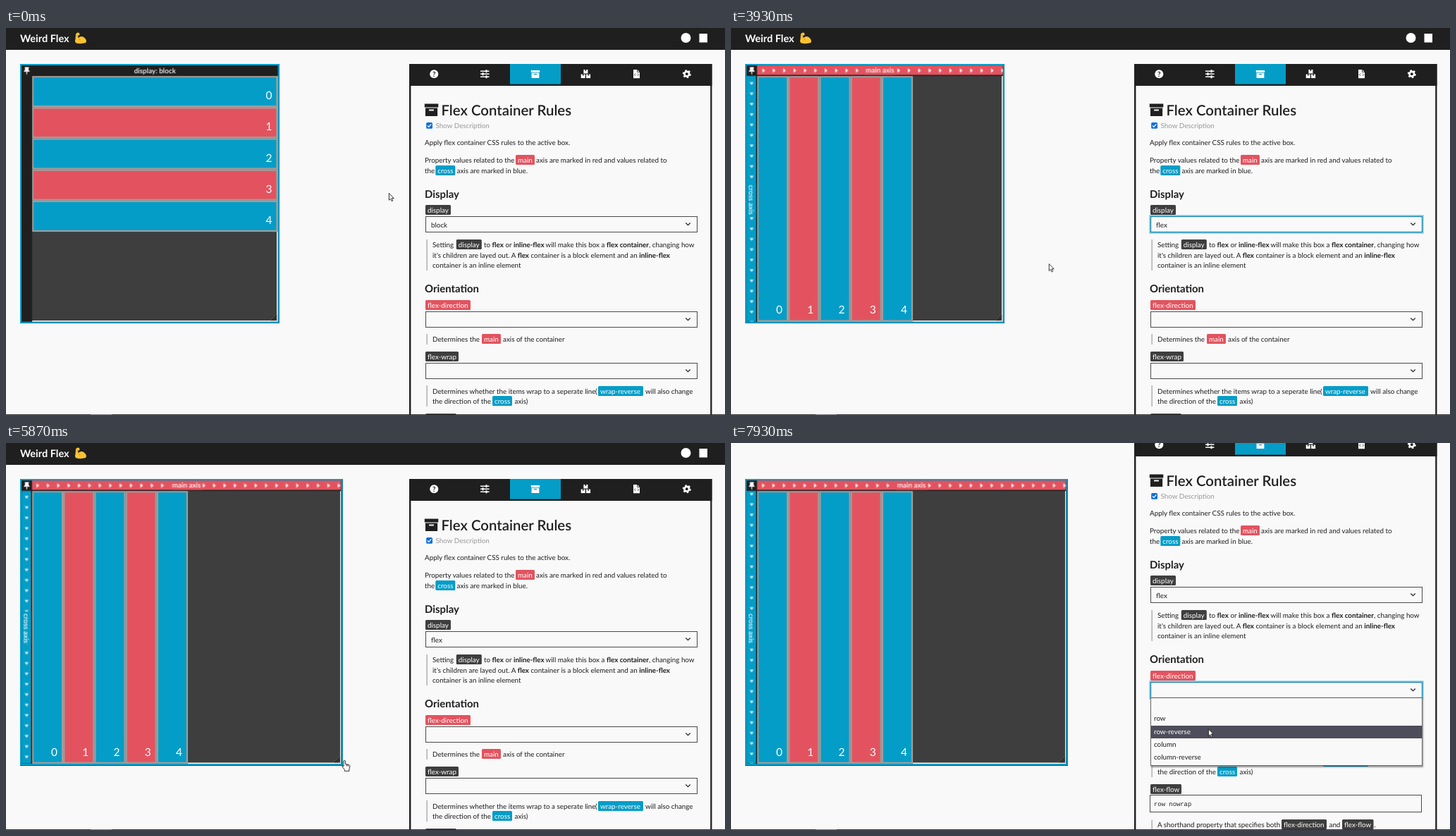
These frames come from a looping animation (1020 by 549 pixels, 8000 ms). An HTML page:

```html
<!DOCTYPE html>
<html lang="en">
<head>
<meta charset="utf-8">
<title>Weird Flex</title>
<style>
:root { --blue: #049dc7; --red: #e3535f; --dark: #3e3e3e; --ink: #1f1f1f; --paper: #f9f9f9; }
html, body { margin: 0; width: 100%; height: 100%; overflow: hidden; background: var(--paper); }
body { font-family: Lato, sans-serif; color: var(--ink); text-rendering: geometricPrecision; }
#stage { position: absolute; left: 0; top: 0; width: 1020px; height: 549px; overflow: hidden; }
#stage svg { display: block; }
.step { animation: 8s step-end infinite; }

/* Scrolling page: header and rules panel */
#page { position: absolute; left: 0; top: 0; width: 1020px; height: 700px; animation: scroll 8s ease-in-out infinite; }
#page text { font-size: 9.83px; fill: var(--ink); white-space: pre; }
#page .b { font-weight: 700; }
#page .logo { font-size: 14.5px; font-weight: 700; fill: #fff; }
#page .h1 { font-size: 20.4px; font-weight: 600; }
#page .h2 { font-size: 14.9px; font-weight: 700; }
#page .chip { fill: #fff; }
#page .muted { fill: #999; }
#page .mono { font: 8.9px "Liberation Mono", monospace; }
.ring { fill: none; }
.r1 { animation-name: ring1; }
.r2 { animation-name: open2; }
.vblock { animation-name: blockOnly; }
.vflex { animation-name: flexOn; }

.list { position: absolute; left: 595px; width: 384px; padding: 2px 0; background: var(--paper);
  border: 1px solid #666; box-shadow: 1px 2px 2px rgba(0,0,0,.4); font-size: 9.83px; }
.list div { height: 18.25px; line-height: 18.25px; padding-left: 4px; }
#list1 { top: 290px; animation-name: open1; }
#list2 { top: 424px; animation-name: open2; }

/* Demo box, laid out in CSS pixels and scaled to the screen */
#box { position: absolute; left: 19.6px; top: 51.2px; box-sizing: border-box; width: 499px; height: 499px;
  transform: scale(.737); transform-origin: 0 0; border: 3px solid var(--blue); background: var(--dark);
  animation: resize 8s ease-in-out infinite; }
#items { position: absolute; inset: 0; display: flex; flex-direction: column; animation-name: layout; }
#items div { flex: 0 0 60px; box-sizing: border-box; position: relative; border: 3px solid #a09d9b;
  background: var(--blue); color: #fff; font-size: 21px; line-height: 1.2; }
#items div:nth-child(even) { background: var(--red); }
#items span { position: absolute; right: 8px; bottom: 7px; }
#bars { position: absolute; inset: 0; color: #fff; font-size: 13.5px; font-weight: 600; animation-name: bars; }
.bar, .axis, .label { position: absolute; }
.bar { background: var(--ink); }
.top { left: 20px; right: 0; top: 0; height: 20px; }
.side { left: 0; top: 20px; bottom: 0; width: 20px; }
.label { inset: 0; display: flex; align-items: center; justify-content: center; }
.label span { line-height: 18px; }
.side .label { writing-mode: vertical-rl; }
.axis { inset: 0; overflow: hidden; animation-name: flexOn; }
.top .axis { bottom: 2px; background: var(--red); }
.side .axis { right: 2px; background: var(--blue); }
.top .axis span { background: var(--red); padding: 0 2px; }
.side .axis span { background: var(--blue); padding: 4px 0 1px; }
.axis svg { position: absolute; width: 100%; height: 100%; }
.runX { animation: runX 8s linear infinite; }
.runY { animation: runY 8s linear infinite; }
.pin { position: absolute; left: 0; top: 0; width: 20px; height: 20px; background: var(--ink); }
.grip { position: absolute; right: 2px; bottom: 2px; width: 12px; height: 12px;
  clip-path: polygon(100% 0, 100% 100%, 0 100%);
  background: repeating-linear-gradient(135deg, #111 0 1.6px, #777 1.6px 3px); }

#cursor { position: absolute; left: 0; top: 0; overflow: visible; animation: move 8s ease-in-out infinite; }
#cursor g { fill: #fff; stroke: #1c1c1c; stroke-width: .9; stroke-linejoin: round; }
#arrow { animation-name: arrow; }
#diag { animation-name: diag; }
#hand { animation-name: hand; }

@keyframes scroll { 0%, 83.87% { transform: none } 90%, 100% { transform: translateY(-63px) } }
@keyframes resize { 0%, 61.6% { width: 499px; height: 499px } 70.8%, 100% { width: 620.5px; height: 551px } }
@keyframes layout {
  0% { flex-direction: column; left: 20px; top: 20px; box-shadow: inset -2px -2px #fff }
  45.85% { flex-direction: row; left: 20px; top: 20px; box-shadow: inset -2px -2px #fff }
  59.1% { flex-direction: row; left: 0; top: 0; box-shadow: inset 0 0 transparent }
  71.45%, 100% { flex-direction: row; left: 20px; top: 20px; box-shadow: inset -2px -2px #fff }
}
@keyframes bars { 0% { opacity: 1 } 59.1% { opacity: 0 } 71.45%, 100% { opacity: 1 } }
@keyframes blockOnly { 0% { opacity: 1 } 45.85%, 100% { opacity: 0 } }
@keyframes flexOn { 0% { opacity: 0 } 45.85%, 100% { opacity: 1 } }
@keyframes ring1 { 0% { opacity: 0 } 34.1% { opacity: 1 } 59.1%, 100% { opacity: 0 } }
@keyframes open1 { 0% { opacity: 0 } 34.1% { opacity: 1 } 45.85%, 100% { opacity: 0 } }
@keyframes open2 { 0% { opacity: 0 } 94.1%, 100% { opacity: 1 } }
/* Arrows cross 5% of the axis length each second and restart with the bars */
@keyframes runX { 0%, 45.85% { transform: none } 59.1% { transform: translateX(25.1px) }
  71.5% { transform: none } 100% { transform: translateX(67.7px) } }
@keyframes runY { 0%, 45.85% { transform: none } 59.1% { transform: translateY(25.1px) }
  71.5% { transform: none } 100% { transform: translateY(59.9px) } }
@keyframes litBlock { 0% { background: #4e4d5b; color: #fff } 39.5%, 100% { background: none; color: #1f1f1f } }
@keyframes litFlex { 0% { background: none; color: #1f1f1f } 39.5%, 100% { background: #4e4d5b; color: #fff } }
@keyframes litBlank { 0% { background: #4e4d5b } 96.9%, 100% { background: none } }
@keyframes litRow { 0% { background: none; color: #1f1f1f } 96.9% { background: #4e4d5b; color: #fff }
  98%, 100% { background: none; color: #1f1f1f } }
@keyframes litReverse { 0% { background: none; color: #1f1f1f } 98%, 100% { background: #4e4d5b; color: #fff } }
@keyframes arrow { 0% { opacity: 1 } 56.6% { opacity: 0 } 74.6%, 100% { opacity: 1 } }
@keyframes diag { 0% { opacity: 0 } 56.6% { opacity: 1 } 72.45%, 100% { opacity: 0 } }
@keyframes hand { 0% { opacity: 0 } 72.45% { opacity: 1 } 74.6%, 100% { opacity: 0 } }
@keyframes move {
  0%, 2.5% { transform: translate(543px, 234px) }
  6.6%, 7.5% { transform: translate(530px, 233px) }
  9% { transform: translate(525px, 231px) }
  15%, 20.9% { transform: translate(595px, 209px) }
  22.5% { transform: translate(592.5px, 210px) }
  30%, 34.1% { transform: translate(714px, 284px) }
  42.5% { transform: translate(705px, 316px) }
  45.2% { transform: translate(705px, 316px); animation-timing-function: ease-in }
  49.125% { transform: translate(451px, 334px); animation-timing-function: ease-out }
  56.6%, 61.6% { transform: translate(376px, 409px) }
  70.8%, 71.8% { transform: translate(465px, 447px) }
  72.5%, 73.6% { transform: translate(480px, 451px) }
  82.5%, 88% { transform: translate(724px, 387px) }
  93%, 94.3% { transform: translate(690px, 352px) }
  99.1%, 100% { transform: translate(677px, 405.5px) }
}
</style>
</head>
<body>
<div id="stage">
  <div id="page">
    <svg id="sheet" width="1020" height="700"></svg>
    <div id="list1" class="list step">
      <div class="step" style="animation-name:litBlock">block</div>
      <div class="step" style="animation-name:litFlex">flex</div>
      <div>inline-flex</div>
    </div>
    <div id="list2" class="list step">
      <div class="step" style="animation-name:litBlank"></div>
      <div class="step" style="animation-name:litRow">row</div>
      <div class="step" style="animation-name:litReverse">row-reverse</div>
      <div>column</div>
      <div>column-reverse</div>
    </div>
  </div>

  <div id="box">
    <div id="items" class="step">
      <div><span>0</span></div><div><span>1</span></div><div><span>2</span></div><div><span>3</span></div><div><span>4</span></div>
    </div>
    <div id="bars" class="step">
      <div class="bar top">
        <div class="label"><span>display: block</span></div>
        <div class="axis step">
          <svg><pattern id="px" width="20" height="20" patternUnits="userSpaceOnUse"><path d="M4 5l5 4.5-5 4.5z" fill="#fff"/></pattern>
            <rect class="runX" x="-100" width="900" height="19" fill="url(#px)"/></svg>
          <div class="label"><span>main axis</span></div>
        </div>
      </div>
      <div class="bar side">
        <div class="axis step">
          <svg><pattern id="py" width="20" height="20" patternUnits="userSpaceOnUse"><path d="M5.5 6h8l-4 4.5z" fill="#fff"/></pattern>
            <rect class="runY" y="-100" width="19" height="800" fill="url(#py)"/></svg>
          <div class="label"><span>cross axis</span></div>
        </div>
      </div>
      <svg class="pin" viewBox="0 0 20 20"><path d="M6 3h8v2h-1l.6 4q2 1 2 3h-5v4l-.8 2-.8-2v-4h-5q0-2 2-3l.6-4H6z" fill="#fff"/></svg>
      <div class="grip"></div>
    </div>
  </div>

  <svg width="1020" height="549" style="position:absolute;left:0;top:0">
    <path d="M0 548.5H1020" stroke="#332f34"/><path d="M120 548.5h30" stroke="#77727a"/>
  </svg>
  <svg id="cursor" width="1" height="1">
    <g id="arrow" class="step"><path d="M.4.4v9.8l2.2-2 1.6 3.5 1.6-.7-1.5-3.4h3z"/></g>
    <g id="diag" class="step"><path d="M-5-5h4L-2.4-3.6 3.6 2.4 5 1V5H1L2.4 3.6-3.6-2.4-5-1z"/></g>
    <g id="hand" class="step"><path d="M-1 0q1.3-1.5 2.4 0v4.5l5 .9q1.6.5 1.4 2.5l-1 4v2.5H.3v-2L-3 8q-.4-2 2 -.5z"/><path d="M3.4 5v2.5M5.4 5.4v2.4" fill="none"/></g>
  </svg>
</div>

<script>
const fills = { red: "var(--red)", blue: "var(--blue)", dark: "var(--dark)" };
const text = (x, y, s, cls = "") => `<text x="${x}" y="${y}" class="${cls}">${s}</text>`;
const bold = s => `<tspan class="b">${s}</tspan>`;
const rect = (x, y, w, h, fill, extra = "") =>
  `<rect x="${x}" y="${y}" width="${w}" height="${h}" fill="${fill}" ${extra}/>`;
const chip = (x, y, w, color, s) =>
  rect(x, Math.round(y - 11), w, 14, fills[color], 'rx="1.5"') + text(x + 3, y, s, "chip");
const noteBar = (y, h) => rect(596.5, y, 1.3, h, "#a5a2a2");
const field = (y, ring = "") => rect(595.5, y, 385, 22, "none", 'stroke="#4a4a4a"') +
  (ring && `<g class="ring step ${ring}">${rect(594.2, y - 1.3, 387.6, 24.6, "none", 'stroke="#86d0e8" stroke-width="2"')}
    ${rect(595.5, y, 385, 22, "none", 'stroke="#1b86ad" stroke-width="1.3"')}</g>`) +
  `<path d="M964.3 ${y + 9}l3.2 3.2 3.2-3.2" fill="none" stroke="#222" stroke-width="1.2"/>`;
const archive = (x, y, size, fill) => `<path transform="translate(${x} ${y}) scale(${size / 20})" fill="${fill}"
  fill-rule="evenodd" d="M0 0h20v5H0zM1.2 6.2h17.6V18H1.2zM6.5 8.2v2h7v-2z"/>`;
const crate = (x, y) => rect(x, y, 6, 5.5, "#fff") + rect(x + 2.2, y, 1.6, 2, "var(--ink)");

const header = rect(0, 0, 1020, 31, "var(--ink)") + text(20, 19.6, "Weird Flex", "logo") +
  `<path d="M99 8.5q2-3 5-1.5l.5 3-2.5 1 .5 3q5-4 9 0 4 4 1.5 7-7 2-13 .5-3-1-1.5-6z" fill="#fdc232"/>
   <path d="M102 11l-2-.5M103 15q2 .5 2 2.5" fill="none" stroke="#d8891c"/>
   <circle cx="964.5" cy="14" r="7" fill="#fff"/>` + rect(983.5, 8, 11.5, 12.5, "#fff");

const nav = rect(572, 51, 429.5, 31, "var(--ink)") + rect(715, 51, 72, 28.6, "var(--blue)") +
  rect(572, 51, 2.4, 649, "var(--ink)") + rect(999.2, 51, 2.3, 649, "var(--ink)") +
  `<circle cx="607.3" cy="65.2" r="6" fill="#fff"/><text x="604.9" y="68.8" class="b">?</text>
   <path d="M673 61.2h12.5M673 65.2h12.5M673 69.2h12.5" stroke="#fff" stroke-width="1.4"/>
   <path d="M681.5 59.2v4M676.5 63.2v4M681.5 67.2v4" stroke="#fff" stroke-width="2"/>` +
  archive(744.8, 60, 12.3, "#fff") + crate(819.4, 59) + crate(815.7, 65.6) + crate(823.1, 65.6) +
  `<path d="M890 59h5.5l3.5 3.5v8.7h-9z" fill="#fff"/>
   <path d="M893 64.5l-1.5 1.7 1.5 1.7M896 64.5l1.5 1.7-1.5 1.7M895.5 59v3.5h3.5" fill="none" stroke="#1f1f1f" stroke-width=".8"/>
   <circle cx="965.8" cy="65.2" r="3.3" fill="none" stroke="#fff" stroke-width="2.6"/>
   <circle cx="965.8" cy="65.2" r="5" fill="none" stroke="#fff" stroke-width="2" pathLength="12" stroke-dasharray="1"/>`;

const intro = archive(593.8, 107.5, 19.5, "var(--ink)") + text(617.5, 124, "Flex Container Rules", "h1") +
  rect(596.2, 134, 8.8, 8.8, "#0b6fdb", 'rx="1.5"') +
  `<path d="M598 138.5l1.9 1.9 3.4-4" fill="none" stroke="#fff" stroke-width="1.3"/>` +
  text(609.5, 142, "Show Description", "muted") +
  text(594, 166.3, "Apply flex container CSS rules to the active box.") +
  text(594, 191, "Property values related to the") + chip(723, 191, 27, "red", "main") +
  text(752, 191, "axis are marked in red and values related to") +
  text(594, 205.8, "the") + chip(609.3, 205.8, 28, "blue", "cross") + text(639.5, 205.8, "axis are marked in blue.");

const display = text(594, 241, "Display", "h2") + chip(595, 262, 36, "dark", "display") + field(267.5, "r1") +
  `<g class="step vblock">${text(603, 282.5, "block")}</g><g class="step vflex">${text(603, 282.5, "flex")}</g>` +
  noteBar(300, 44) + text(605, 310.8, "Setting") + chip(638.8, 310.8, 36, "dark", "display") +
  text(678, 310.8, `to ${bold("flex")} or ${bold("inline-flex")}`) +
  text(765.5, 310.8, `will make this box a ${bold("flex container")}, changing how`) +
  text(605, 325.5, `it's children are layed out. A ${bold("flex")} container is a block element and an ${bold("inline-flex")}`) +
  text(605, 340.2, "container is an inline element");

const orientation = text(594, 375.2, "Orientation", "h2") + chip(595, 397, 64, "red", "flex-direction") + field(402.5, "r2") +
  noteBar(434, 15) + text(605, 445.2, "Determines the") + chip(675, 445.2, 27, "red", "main") +
  text(705, 445.2, "axis of the container") +
  chip(595, 470, 47, "dark", "flex-wrap") + field(475.5) +
  noteBar(507, 30) + text(605, 518.6, "Determines whether the items wrap to a seperate line") + text(836, 518.6, "(") +
  chip(840, 518.6, 64, "blue", "wrap-reverse") + text(907, 518.6, "will also change") +
  text(605, 533.2, "the direction of the") + chip(690, 533.2, 28, "blue", "cross") + text(721.5, 533.2, "axis)") +
  chip(595, 558, 44, "dark", "flex-flow") + rect(594.5, 562.5, 385, 24, "none", 'stroke="#4a4a4a"') +
  text(600, 577.5, "row nowrap", "mono") +
  noteBar(597.5, 15) + text(605, 608, "A shorthand property that specifies both") +
  chip(781, 608, 64, "dark", "flex-direction") + text(848.5, 608, "and") +
  chip(867, 608, 44.5, "dark", "flex-flow") + text(912.5, 608, ".");

document.getElementById("sheet").innerHTML = header + nav + intro + display + orientation;
</script>
</body>
</html>
```
